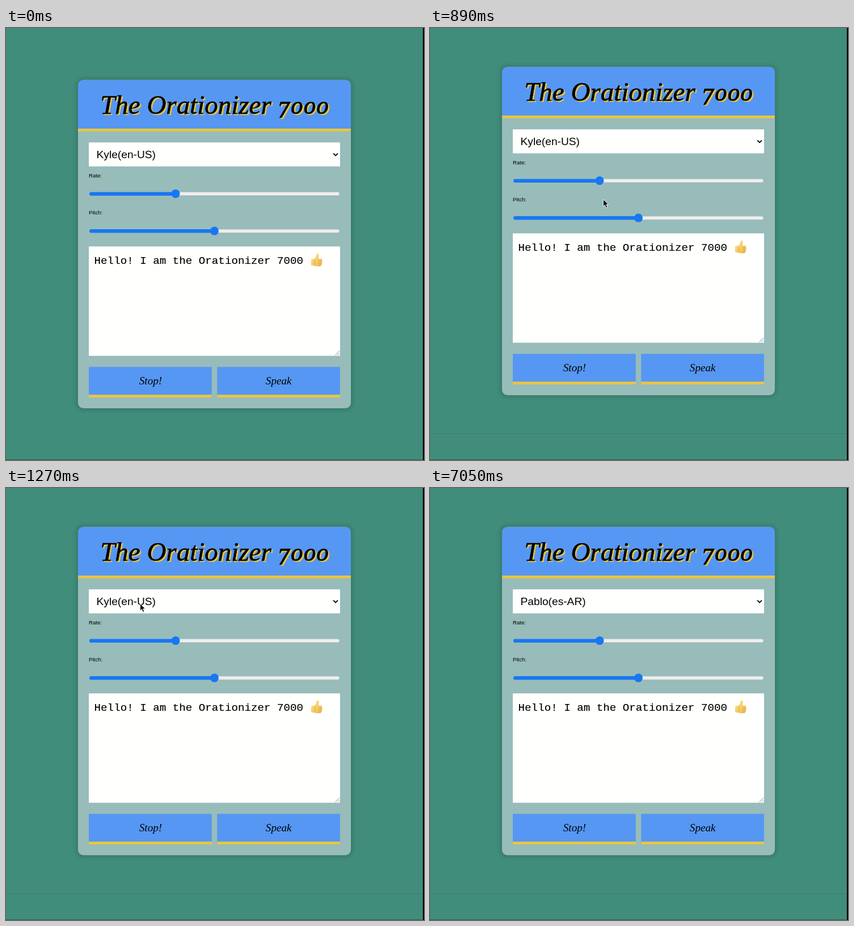
An HTML page for the animation above (8000 ms loop, 737x760 px).

```html
<!DOCTYPE html>
<html lang="en">
<head>
<meta charset="utf-8">
<title>Speech form</title>
<style>
  html, body { margin: 0; width: 100%; height: 100%; overflow: hidden; background: #418d7b; }
  svg { display: block; width: 737px; height: 760px; }
  .shadow { fill: rgba(0, 0, 0, .1); filter: blur(2.4px); }
  .card { fill: #97bcba; }
  .blue { fill: #5697f3; }
  .gold { fill: #ebc53d; }
  .field { fill: #fffffe; }
  .title { font: italic 47px "Liberation Serif", "Times New Roman", serif; text-anchor: middle; stroke-width: .6px; }
  .digits { font-family: "Noto Serif", serif; font-size: 39px; font-variant-numeric: oldstyle-nums; }
  .label { font: 9.6px "Liberation Sans", Arial, sans-serif; }
  .voice { font: 19.2px "Liberation Sans", Arial, sans-serif; }
  .message { font: 19.2px "Liberation Mono", "Courier New", monospace; stroke: #000; stroke-width: .15px; }
  .button { font: italic 19.2px "Liberation Serif", "Times New Roman", serif; text-anchor: middle; }
  .track { fill: #efefef; stroke: #c4cccb; stroke-width: .7px; }
  .fill { fill: #1877f2; }
  .hover .track { fill: #e4e4e4; }
  .hover .fill { fill: #0c62d0; }
</style>
</head>
<body>
<svg viewBox="0 0 737 760">
  <defs>
    <text id="title" class="title" x="368" y="128">The Orationizer <tspan class="digits">7000</tspan></text>
    <g id="rate">
      <rect class="track" x="147.3" y="265.8" width="440.4" height="5.8" rx="2.9"/>
      <rect class="fill" x="147" y="265.5" width="152" height="6.4" rx="3.2"/>
      <circle class="fill" cx="299" cy="268.6" r="7.5"/>
    </g>
    <linearGradient id="skin" x1="0" y1="0" x2="1" y2="1">
      <stop offset="0" stop-color="#ffe284"/>
      <stop offset="1" stop-color="#ecb850"/>
    </linearGradient>
  </defs>

  <rect width="737" height="760" fill="#418d7b"/>
  <path id="seam" d="M0 713.5H735" stroke="#397d6d"/>

  <g id="form">
    <rect class="shadow" x="122.2" y="63.7" width="490.6" height="587.1" rx="14.4"/>
    <rect class="card" x="127" y="68.5" width="481" height="577.5" rx="9.6"/>
    <path class="blue" d="M127 154V78.1a9.6 9.6 0 0 1 9.6-9.6H598.4a9.6 9.6 0 0 1 9.6 9.6V154z"/>
    <rect class="gold" x="127" y="154" width="481" height="4.8"/>
    <use href="#title" x="2.4" y="2.4" fill="#ebc53d" stroke="#ebc53d"/>
    <use href="#title" fill="#000" stroke="#000"/>

    <rect class="field" x="146" y="178.3" width="443" height="42.2"/>
    <g id="voices" class="voice">
      <text x="159.5" y="206">Kyle(en-US)</text>
      <text x="159.5" y="206">Livia(it-IT)</text>
      <text x="159.5" y="206">Pablo(es-AR)</text>
    </g>
    <path d="M577.2 197.6l3.9 3.9 3.9-3.9" fill="none" stroke="#000" stroke-width="1.8"/>

    <text class="label" x="146" y="240">Rate:</text>
    <use href="#rate"/>
    <g id="hover" class="hover">
      <rect class="track" x="147.3" y="265.8" width="440.4" height="5.8" rx="2.9"/>
      <rect class="fill" x="147" y="265.5" width="152" height="6.4" rx="3.2"/>
      <circle class="fill" cx="299" cy="268.6" r="7.5"/>
    </g>

    <text class="label" x="146" y="305">Pitch:</text>
    <rect class="track" x="147.3" y="331.3" width="440.4" height="5.8" rx="2.9"/>
    <rect class="fill" x="147" y="331" width="220.5" height="6.4" rx="3.2"/>
    <circle class="fill" cx="367.5" cy="334.1" r="7.5"/>

    <rect class="field" x="146" y="361.3" width="443" height="192.4"/>
    <text class="message" x="155.6" y="392">Hello! I am the Orationizer 7000</text>
    <g id="thumb">
      <path fill="url(#skin)" d="M538 385q0-1.6 1.7-1.7h3.3q3-2 4-5 .5-4 2.2-4.5 2.4-.3 2.5 3.2 0 3-1 5.800h5q2 .3 1.9 2.1 0 1.3-.8 1.7 1.3.8 1.1 2.2-.2 1.4-1.3 1.8.9.9.5 2.1-.4 1.3-1.5 1.5.5 1.9-1.6 2.1h-6.5q-2.7 0-4.7-1.3h-3.1q-1.7 0-1.7-1.7z"/>
      <path d="M550.5 386.800h6.3M550.3 390.7h6.3M550 394.2h5.2M544.4 384.3v10" fill="none" stroke="#d09a3c" stroke-width=".8"/>
    </g>
    <path d="M580.5 552.5l7.5-7.5M584.8 552.5l3.2-3.2" stroke="#777" stroke-width=".9"/>

    <rect class="blue" x="146" y="573.3" width="216.7" height="49"/>
    <rect class="gold" x="146" y="622.2" width="216.7" height="4.8"/>
    <text class="button" x="255" y="604">Stop!</text>
    <rect class="blue" x="372.3" y="573.3" width="216.7" height="49"/>
    <rect class="gold" x="372.3" y="622.2" width="216.7" height="4.8"/>
    <text class="button" x="480.7" y="604">Speak</text>
  </g>

  <g id="cursor">
    <path d="M.5.5V13l2.9-2.7 2.1 5 2.3-1-2.1-4.8h3.8z" fill="#000" stroke="#fff" stroke-width=".9" stroke-linejoin="round"/>
  </g>

  <rect x="735" width="2" height="760" fill="#000"/>
  <rect y="759" width="735" height="1" fill="#2c5f53"/>
</svg>

<script>
  const LOOP = 8000;
  const byId = id => document.getElementById(id);

  // Each step is [time, value]; the value holds until the next step.
  function hold(element, property, steps) {
    const frames = steps.map(([time, value]) =>
      ({ offset: time / LOOP, [property]: value, easing: "steps(1, end)" }));
    frames.push({ offset: 1, [property]: steps[steps.length - 1][1] });
    element.animate(frames, { duration: LOOP, iterations: Infinity });
  }

  function showBetween(element, start, end) {
    const steps = [[start, 1]];
    if (start > 0) steps.unshift([0, 0]);
    if (end < LOOP) steps.push([end, 0]);
    hold(element, "opacity", steps);
  }

  const move = (x, y) => `translate(${x}px, ${y}px)`;

  hold(byId("form"), "transform", [[0, move(0, 23)], [380, move(0, 0)]]);
  showBetween(byId("seam"), 380, LOOP);

  const path = [
    [0, 308, 303], [700, 308, 303], [790, 307, 303], [890, 305, 301],
    [1000, 296, 287], [1090, 275, 264], [1180, 248, 220], [1270, 236, 203]
  ];
  hold(byId("cursor"), "transform", path.map(([time, x, y]) => [time, move(x, y)]));
  showBetween(byId("cursor"), 700, 3260);
  showBetween(byId("hover"), 1090, 1180);

  const changes = [0, 4450, 7050, LOOP];
  [...byId("voices").children].forEach((voice, i) => showBetween(voice, changes[i], changes[i + 1]));
</script>
</body>
</html>
```
